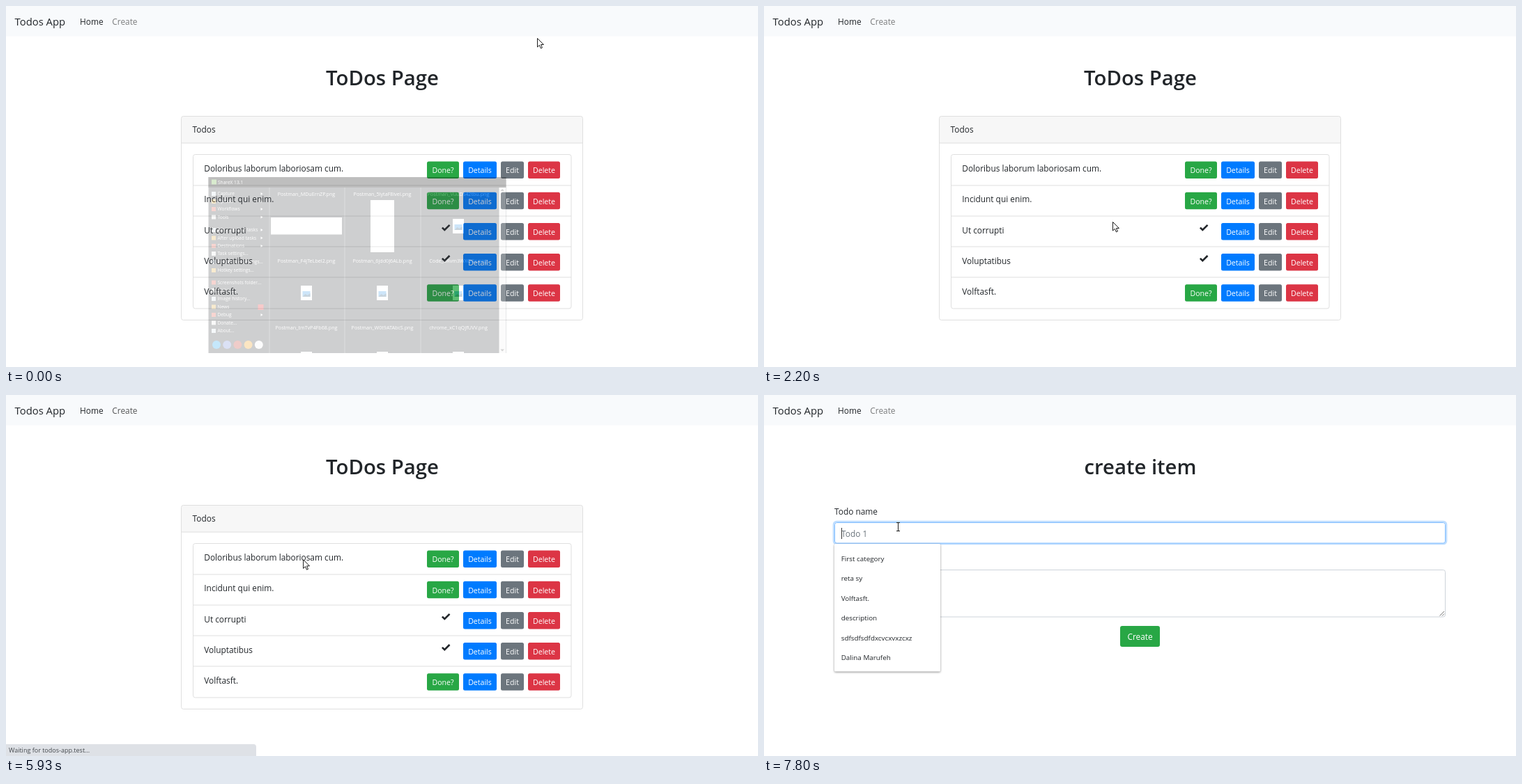
An HTML page for the animation above (8 s loop, 1079 px wide and 519 px high).

```html
<!DOCTYPE html>
<html lang="en">
<head>
<meta charset="utf-8">
<title>Todos App</title>
<style>
  html, body { margin: 0; width: 100%; height: 100%; overflow: hidden; background: #fff; }
  svg { display: block; width: 1079px; height: 519px; font: 11.87px "Open Sans", "Noto Sans", sans-serif; fill: #212529; }
  text { white-space: pre; }
  .mid { text-anchor: middle; }
  .title { font-size: 29.3px; font-weight: 600; }
  .small { font-size: 10.6px; }
  .box { fill: none; stroke: #dfdfdf; }
  .field { fill: #fff; stroke: #ced4da; }
  .hint { fill: #6c757d; }
  .status { font-size: 9px; fill: #45494d; }
  .option { font-size: 9.85px; font-weight: 500; }
  .drop { fill: #fff; filter: drop-shadow(0 1px 1.5px rgba(0, 0, 0, .45)); }
  .tiny { font-size: 7.2px; fill: #fff; }
  .tiny.menu { font-size: 6.6px; }
  .pointer path { fill: #fff; stroke: #111; stroke-width: .95; stroke-linejoin: round; }
</style>
</head>
<body>
<svg id="stage" viewBox="0 0 1079 519"></svg>
<script>
const LOOP = 8000, STEP = 1000 / 15;
const stage = document.getElementById('stage');

const rect = (x, y, w, h, attrs = '') => `<rect x="${x}" y="${y}" width="${w}" height="${h}" ${attrs}/>`;
const text = (x, y, s, attrs = '') => `<text x="${x}" y="${y}" ${attrs}>${s}</text>`;
const group = (id, body, attrs = '') => `<g id="${id}" ${attrs}>${body}</g>`;
const path = (d, attrs = '') => `<path d="${d}" ${attrs}/>`;

function button(x, y, w, label, color) {
  return rect(x, y, w, 24.5, `rx="2.5" fill="${color}"`) +
    text(x + w / 2, y + 16.8, label, 'class="mid small" fill="#fff"');
}

function todoRow(name, i, done) {
  const y = 213.5 + 44.2 * i;
  return (i ? rect(268, Math.round(y) - .5, 543, 1, 'fill="#dfdfdf"') : '') +
    text(284.3, y + 24.6, name) +
    (done
      ? path(`M625.9 ${y + 105.3 - 88.4 - 0.2}l3.4 3.4 7.2-7.2`, 'fill="none" stroke="#212529" stroke-width="2.6"')
      : button(604, y + 10, 46, 'Done?', '#28a745')) +
    button(656, y + 10, 48, 'Details', '#007bff') +
    button(710, y + 10, 33, 'Edit', '#6c757d') +
    button(749, y + 10, 46, 'Delete', '#dc3545');
}

const navbar = rect(0, 0, 1079, 43.5, 'fill="#f8fafc"') +
  text(12.6, 28.3, 'Todos App', 'style="font-size:14.8px"') +
  text(106, 27, 'Home') +
  text(152.3, 27, 'Create', 'id="link"');

const todos = ['Doloribus laborum laboriosam cum.', 'Incidunt qui enim.', 'Ut corrupti', 'Voluptatibus', 'Volftasft.'];
const listPage = text(540, 114, 'ToDos Page', 'class="mid title"') +
  rect(251.5, 158.5, 576, 39, 'rx="3" fill="#f7f7f7"') +
  rect(251.5, 158.5, 576, 293, 'class="box" rx="3"') +
  rect(252, 196.5, 575, 1, 'fill="#dfdfdf"') +
  text(267.6, 182.4, 'Todos') +
  rect(268.5, 213.5, 542.5, 221.5, 'class="box" rx="3"') +
  todos.map((name, i) => todoRow(name, i, i === 2 || i === 3)).join('');

const options = ['First category', 'reta sy', 'Volftasft.', 'description', 'sdfsdfsdfdxcvcxvxzcxz', 'Dalina Marufeh'];
const formPage = text(540, 114, 'create item', 'class="mid title"') +
  text(101, 172.3, 'Todo name') +
  rect(100, 182, 879, 32, 'id="glow" rx="4" fill="none" stroke="#007bff" stroke-width="2.6"') +
  rect(101.5, 183.5, 876, 29.5, 'id="name" class="field" rx="3"') +
  text(111, 203.6, 'Todo 1', 'class="hint"') +
  rect(111, 191, 1, 16, 'id="caret" fill="#333"') +
  text(101, 240.3, 'description') +
  rect(101.5, 251.5, 876, 67.5, 'class="field" rx="3"') +
  path('M969.5 317.5l6.5-6.5M973 317.5l3-3', 'stroke="#666" stroke-width=".9"') +
  rect(511, 332, 57, 30, 'rx="3" fill="#28a745"') +
  text(539.5, 351.5, 'Create', 'class="mid" fill="#fff"') +
  group('drop', rect(101, 214, 152, 183.5, 'class="drop" rx="1.5"') +
    options.map((s, i) => text(110.7, 238.7 + 28.45 * i, s, 'class="option"')).join(''));

// Dark screenshot window that fades away at the start.
function fileIcon(x, y) {
  return rect(x - 8, y - 10, 16, 21, 'fill="#fff"') +
    rect(x - 5.5, y - 2, 11, 8, 'fill="#3b9be8"') +
    path(`M${x - 5.5} ${y + 6}l4-4 3 2 4-3v5z`, 'fill="#27567d"');
}
const menu = [[270, 'Capture'], [281, 'Upload'], [292, 'Workflows'], [303.5, 'Tools'], [322, 'After capture tasks'],
  [333.5, 'After upload tasks'], [345, 'Destinations'], [356, 'Task settings...'], [368, 'Application settings...'],
  [380, 'Hotkey settings...'], [397.5, 'Screenshots folder...'], [409, 'History...'], [421, 'Image history...'],
  [432.5, 'News'], [444, 'Debug'], [455.5, 'Donate...'], [467, 'About...']];
const files = ['Postman_MDuErnZP.png', 'Postman_5lytaF8ivel.png', 'Postman_VuuDs42tbu.png',
  'Postman_F4jTeLbel2.png', 'Postman_6jdd0J6ALb.png', 'Code_uRvm3WXQGc.png',
  'Postman_tmTvP4Fb68.png', 'Postman_W0t9ATAbcS.png', 'chrome_xC1qQjfUVV.png'];
const tints = ['#d8e4ee', '#e5b343', '#e05a4a', '#e8e8e8'];
const windowArt = rect(290.5, 246, 427, 253, 'fill="#3f4246"') +
  rect(290.5, 246, 427, 15, 'fill="#000"') +
  rect(295, 249.5, 7, 7, 'fill="#6db33f"') +
  text(304, 256, 'ShareX 13.1', 'class="tiny menu"') +
  menu.map(([y, s], i) => rect(295, y - 3, 6, 6, `fill="${tints[i % 4]}"`) +
    text(303.5, y + 2.4, s, 'class="tiny menu"') +
    (i < 7 || i === 14 ? path(`M365.5 ${y - 2}l3 2-3 2z`, 'fill="#fff"') : '')).join('') +
  rect(361.5, 429, 8, 8, 'fill="#e03131"') +
  ['#1da1f2', '#7289da', '#c0392b', '#f39c12', '#f5f5f5'].map((c, i) =>
    `<circle cx="${302 + 15.2 * i}" cy="487" r="6" fill="${c}"/>`).join('') +
  [377.5, 485.5, 594.5].map(x => rect(x, 261, 1, 238, 'fill="#80848a"')).join('') +
  files.map((s, i) => text(431 + 109 * (i % 3), 272.5 + 96 * (i / 3 | 0), s, 'class="mid tiny"')).join('') +
  rect(380, 304, 102, 24.5, 'fill="#fff"') + rect(523, 279, 34, 75, 'fill="#fff"') +
  [[649, 316], [431, 412], [540, 412], [649, 412]].map(p => fileIcon(...p)).join('') +
  [431, 540, 649].map(x => rect(x - 8, 497, 16, 2, 'fill="#fff"')).join('') +
  rect(707.5, 261, 9.5, 238, 'fill="#f0f0f0"') +
  path('M709.5 266l2.7-3 2.7 3zM709.5 493.5l2.7 3 2.7-3z', 'fill="#555"');

const pointers = {
  arrow: path('M.5.5V13l2.9-2.7 2 4.6 2-.9-1.9-4.5h3.9z'),
  hand: path('M-1.5 11V1.2Q-1.5-.1-.1-.1T1.3 1.2V6L6.4 7.2Q8 7.7 8 9.6V12.2Q8 15 6.6 18.5H-.8Q-2 15-4.8 11.8-5.6 9.7-4 9.4-2.8 9.5-1.5 11z') +
    path('M1.3 6v2.8M3.7 6.8v2.4M6 7.3v2.2'),
  beam: path('M-2.5-6H2.5M0-6V6M-2.5 6H2.5')
};

stage.innerHTML = navbar + group('list', listPage) + group('form', formPage) +
  group('status', path('', 'id="bar" fill="#dee1e6"') + text(4, 514, '', 'id="note" class="status"')) +
  group('window', windowArt) +
  group('pointer', Object.entries(pointers).map(([k, v]) => group(k, v)).join(''), 'class="pointer"');

const el = {};
stage.querySelectorAll('[id]').forEach(node => el[node.id] = node);
const show = (node, on) => node.style.display = on ? '' : 'none';
const clamp = v => Math.max(0, Math.min(1, v));

// Pointer track: time, x, y
const track = [[0, 762, 46], [733, 480, 190], [933, 400, 170], [1333, 188, 4], [1733, 570, 326], [2000, 692, 414],
  [2200, 500, 310], [2600, 188, 63], [3067, 187, 25], [5333, 187, 25], [5400, 195, 30], [6067, 484, 288],
  [6600, 484, 288], [7467, 192.5, 188.5], [7533, 192.5, 189.5], [LOOP, 192.5, 189.5]];

function pointAt(t) {
  const i = Math.max(1, track.findIndex(k => k[0] >= t));
  const [a, b] = [track[i - 1], track[i]];
  const p = clamp((t - a[0]) / (b[0] - a[0]));
  return [a[1] + (b[1] - a[1]) * p, a[2] + (b[2] - a[2]) * p];
}

function draw(now) {
  const t = Math.floor((now % LOOP + 3.5) / STEP) * STEP;
  const [x, y] = pointAt(t);
  const onForm = t > 6260;

  show(el.list, !onForm);
  show(el.form, onForm);
  el.window.setAttribute('opacity', .25 * clamp(1 - t / 100));

  const overLink = !onForm && x > 150 && x < 200 && y < 43;
  const lit = overLink || (t > 5390 && !onForm);
  el.link.setAttribute('fill', `rgba(0,0,0,${lit ? .66 : .5})`);

  const inField = x > 101 && x < 978 && (y > 183 && y < 213 || y > 251 && y < 319);
  const kind = overLink && !(t > 3860 && t < 5390) ? 'hand' : t > 6650 && inField ? 'beam' : 'arrow';
  for (const k in pointers) show(el[k], k === kind);
  el.pointer.setAttribute('transform', `translate(${x} ${y})`);

  const waiting = t > 5525;
  const width = 100 + 259 * clamp((t - 5500) / 130);
  el.bar.setAttribute('d', `M0 502H${width - 4}q4 0 4 4V519H0z`);
  el.note.textContent = waiting ? 'Waiting for todos-app.test...' : 'todos-app.test/create';
  el.status.setAttribute('opacity', clamp((t - 3200) / 130) * clamp((6800 - t) / 130));

  const focus = clamp((t - 7600) / 200);
  el.glow.setAttribute('opacity', .25 * focus);
  el.name.style.stroke = focus ? `rgb(${206 - 78 * focus},${212 - 23 * focus},${218 + 37 * focus})` : '';
  show(el.caret, focus > 0);
  show(el.drop, focus > .5);
}

function frame(now) {
  draw(now - start);
  requestAnimationFrame(frame);
}
const start = performance.now();
draw(0);
requestAnimationFrame(now => frame(Math.max(now, start)));
</script>
</body>
</html>
```
